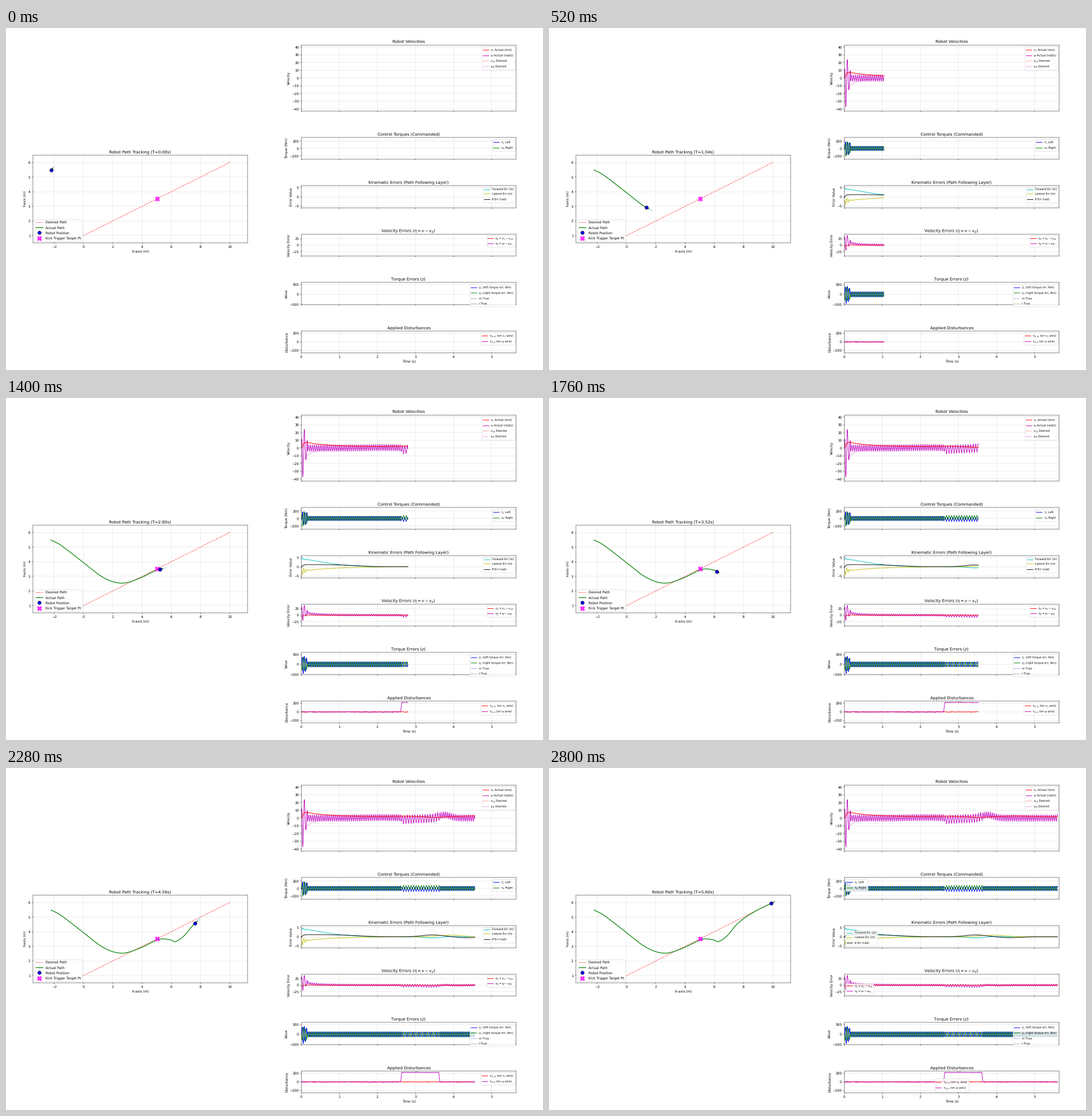
Recreate the animation shown at these times as a matplotlib script. Size 938x597 px, loop 2.84 s.

```python
import numpy as np
import matplotlib.pyplot as plt
from matplotlib.animation import FuncAnimation
from matplotlib.gridspec import GridSpec
from matplotlib.patheffects import Normal

W, H, DPI = 938, 597, 42.64
FRAMES, INTERVAL = 71, 40
STEP, DT = 16, 0.005            # samples per frame, seconds per sample
SETTLE = 0.16                   # end of the starting transient
KICK_ON, KICK_OFF = 2.63, 3.63

plt.rcParams["text.hinting"] = "no_hinting"

t = np.arange((FRAMES - 1) * STEP + 1) * DT
kick = (t >= KICK_ON) & (t < KICK_OFF)
rng = np.random.default_rng(4)


def bump(center, width):
    return np.exp(-((t - center) / width) ** 2)


def fade(span, power=1):
    return np.exp(-(t / span) ** power)


def burst(amp, peak, period, span):
    """Starting oscillation that reaches a crest at the given time."""
    swing = np.cos(2 * np.pi * (t - peak) / period)
    return amp * fade(span) * swing * np.minimum(t / .03, 1) * (t < SETTLE)


def hermite(ts, vs):
    """Smooth curve through the values at the given times."""
    slope = np.gradient(vs, ts)
    k = np.clip(np.searchsorted(ts, t, side="right") - 1, 0, len(ts) - 2)
    h = ts[k + 1] - ts[k]
    u = (t - ts[k]) / h
    return ((1 + 2 * u) * (1 - u) ** 2 * vs[k] + u * (1 - u) ** 2 * h * slope[k]
            + u * u * (3 - 2 * u) * vs[k + 1] + u * u * (u - 1) * h * slope[k + 1])


# Controller chatter: a fast triangle wave, slower while the kick lasts
phase = .25 + np.cumsum(np.where(kick, 15, 20) * DT)
chatter = 2 / np.pi * np.arcsin(np.sin(2 * np.pi * phase)) * (t >= SETTLE)

# Robot path through a few way points: time, x, y
way = np.array([
    (0, -2.22, 5.48), (.12, -1.78, 5.27), (.45, -.3, 4.165),
    (1.04, 1.338, 2.93), (1.6, 2.57, 2.533), (2.2, 3.822, 2.86),
    (2.8, 5.211, 3.487), (3.26, 5.935, 3.44), (3.72, 6.326, 3.331),
    (4.1, 6.87, 3.71), (4.56, 7.617, 4.575), (5.0, 8.58, 5.27),
    (5.6, 9.898, 5.937)])
px = hermite(way[:, 0], way[:, 1])
py = hermite(way[:, 0], way[:, 2])
heading = np.arctan2(np.gradient(py), np.gradient(px))
heading[0] = np.pi / 4

# Velocities
v = ((2 + 7 * fade(.55) + .5 * bump(2.65, .4) - 1.2 * bump(3.5, .3)
      + .7 * bump(4.5, .4)) * (1 - fade(.06, 2)))
eta1 = .8 * bump(.12, .06) - 7 * fade(.04)
omega = (burst(58, .08, .08, .09) + np.where(kick, 5.8, 4.3) * chatter
         + .7 * bump(2.1, .6) + 4 * bump(3.76, .22)
         - 2.5 * kick * np.exp((KICK_ON - t) / .5))
omega_d = (.6 * bump(2.1, .6) + 4 * bump(3.6, .45)
           - 16 * fade(.15) - 5 * fade(.6))

# Torques and torque errors
bias = 25 * kick
tau_l = burst(180, .03, .06, .9) + 62 * chatter - bias
tau_r = burst(-240, .04, .06, .3) - 62 * chatter + bias
z_l = burst(560, .08, .06, .25) - 135 * chatter
z_r = burst(-450, .08, .06, .25) + 135 * chatter

# Kinematic errors
err_f = (4.2 * fade(.85, 1.5) + burst(.8, .04, .08, .1)
         - .6 * bump(3.45, .3) + .2 * bump(4, .25))
err_l = (burst(-2.6, .03, .07, .1) - 2.4 * fade(.75)
         + .2 * bump(2.6, .4) + .9 * bump(3.9, .45))
err_a = (1.15 * fade(1.6, 4) * (1 - 1.5 * fade(.03)) + burst(.3, .08, .07, .1)
         + bump(3.45, .4) - .5 * bump(4.35, .35) + .08 * kick * chatter)

# Disturbances: sensor-like noise plus the kick itself
noise = rng.normal(0, 4, (2, len(t) // 4 + 1)).repeat(4, axis=1)[:, :len(t)]
push = np.clip(np.minimum(t - KICK_ON + .02, KICK_OFF + .01 - t) / .03, 0, 1)
dist_v, dist_w = noise[0], noise[1] + 220 * push

fig = plt.figure(figsize=((W + 1e-6) / DPI, (H + 1e-6) / DPI), dpi=DPI)
grid = GridSpec(6, 2, figure=fig, height_ratios=[3, 1, 1, 1, 1, 1],
                left=.05, right=.95, top=.95, bottom=.05, hspace=.9, wspace=.25)

# Map of the robot
field = fig.add_subplot(grid[:, 0])
field.set(xlim=(-3.46, 11.22), ylim=(.5, 6.5), xlabel="X-axis (m)",
          ylabel="Y-axis (m)")
field.set_aspect("equal")
field.grid(True, alpha=.5)
title = field.set_title("")
field.plot([0, 10], [1, 6], "r--", alpha=.7, label="Desired Path")
trail, = field.plot([], [], "g-", lw=2, label="Actual Path")
robot, = field.plot([], [], "bo", ms=10, mec="k", zorder=4,
                    label="Robot Position")
field.plot([5.03], [3.515], "X", color="magenta", ms=12, alpha=.8, ls="none",
           label="Kick Trigger Target Pt")
speed_line, = field.plot([], [], "c-", alpha=.6, zorder=3)
nose, = field.plot([], [], "k-", zorder=5)
field.legend(loc="lower left", labelspacing=.55)

# Time plots
series = []


def outline_math(texts):
    """Draw formulas as outlines, which stay crisp at this small size."""
    for text in texts:
        if "$" in text.get_text():
            text.set_path_effects([Normal()])


def panel(row, name, ylabel, limits, *curves):
    ax = fig.add_subplot(grid[row, 1])
    ax.set(xlim=(0, 5.645), ylim=limits, ylabel=ylabel)
    outline_math([ax.set_title(name)])
    ax.grid(True, alpha=.5)
    ax.tick_params(labelbottom=row == 5)
    for data, style, label, *z in curves:
        line, = ax.plot([], [], style, label=label, zorder=z[0] if z else 2)
        series.append((line, data))
    return ax


def legend(ax, spacing=.2):
    key = ax.legend(loc="upper right", fontsize="small", labelspacing=spacing,
                    borderpad=.35)
    outline_math(key.get_texts())
    return key


legend(panel(0, "Robot Velocities", "Velocity", (-42.7, 42.7),
             (v, "r-", r"$v_1$ Actual (m/s)", 2.1),
             (omega, "m-", r"$\omega$ Actual (rad/s)"),
             (v - eta1, "r:", r"$v_{1d}$ Desired"),
             (omega_d, "m:", r"$\omega_d$ Desired")))
key_torque = legend(panel(
    1, "Control Torques (Commanded)", "Torque (Nm)", (-295, 295),
    (tau_l, "b-", r"$\tau_L$ Left"), (tau_r, "g-", r"$\tau_R$ Right")))
key_path = legend(panel(
    2, "Kinematic Errors (Path Following Layer)", "Error Value", (-5.9, 5.9),
    (err_f, "c-", "Forward Err (m)"), (err_l, "y-", "Lateral Err (m)"),
    (err_a, "k-", r"$\theta$ Err (rad)")), spacing=.55)
key_velocity = legend(panel(
    3, r"Velocity Errors ($\eta = v - v_d$)", "Velocity Error", (-42.7, 42.7),
    (eta1, "r-", r"$\eta_1 = v_1 - v_{1d}$", 2.1),
    (omega - omega_d, "m-", r"$\eta_2 = \omega - \omega_d$")))
ax_z = panel(4, "Torque Errors ($z$)", "Value", (-510, 595),
             (z_l, "b-", r"$z_1$ (left torque err, Nm)"),
             (z_r, "g-", r"$z_2$ (right torque err, Nm)"))
for label in ("$m$ True", "$I$ True"):
    ax_z.plot([], [], "k--", alpha=.5, label=label)
key_z = legend(ax_z)
ax_d = panel(5, "Applied Disturbances", "Disturbance", (-254, 254),
             (dist_v, "r-", r"$\tau_{d,v1}$ (on $v_1$ axis)"),
             (dist_w, "m-", r"$\tau_{d,\omega}$ (on $\omega$ axis)"))
ax_d.set_xlabel("Time (s)")
key_dist = legend(ax_d)

# Legends that step aside once the curves crowd them: new place, time
moves = [(key_torque, "upper left", 5.58), (key_path, "lower left", 5.5),
         (key_velocity, "lower left", 5.58), (key_dist, "lower center", 5.34)]


def ray(line, i, length):
    x, y, a = px[i], py[i], heading[i]
    line.set_data([x, x + length * np.cos(a)], [y, y + length * np.sin(a)])


def update(frame):
    i = frame * STEP
    title.set_text(f"Robot Path Tracking (T={t[i]:.2f}s)")
    trail.set_data(px[:i + 1], py[:i + 1])
    robot.set_data([px[i]], [py[i]])
    ray(nose, i, .22)
    ray(speed_line, i, .17 * v[i])
    for line, data in series:
        line.set_data(t[:i + 1], data[:i + 1])
    for key, place, when in moves:
        key.set_loc(place if t[i] >= when else "upper right")
    for handle, color in zip(key_z.legend_handles[2:], "bg"):
        handle.set_color(color if frame else "k")
    return []


anim = FuncAnimation(fig, update, frames=FRAMES, interval=INTERVAL,
                     repeat=True, repeat_delay=0)
plt.show()
```
